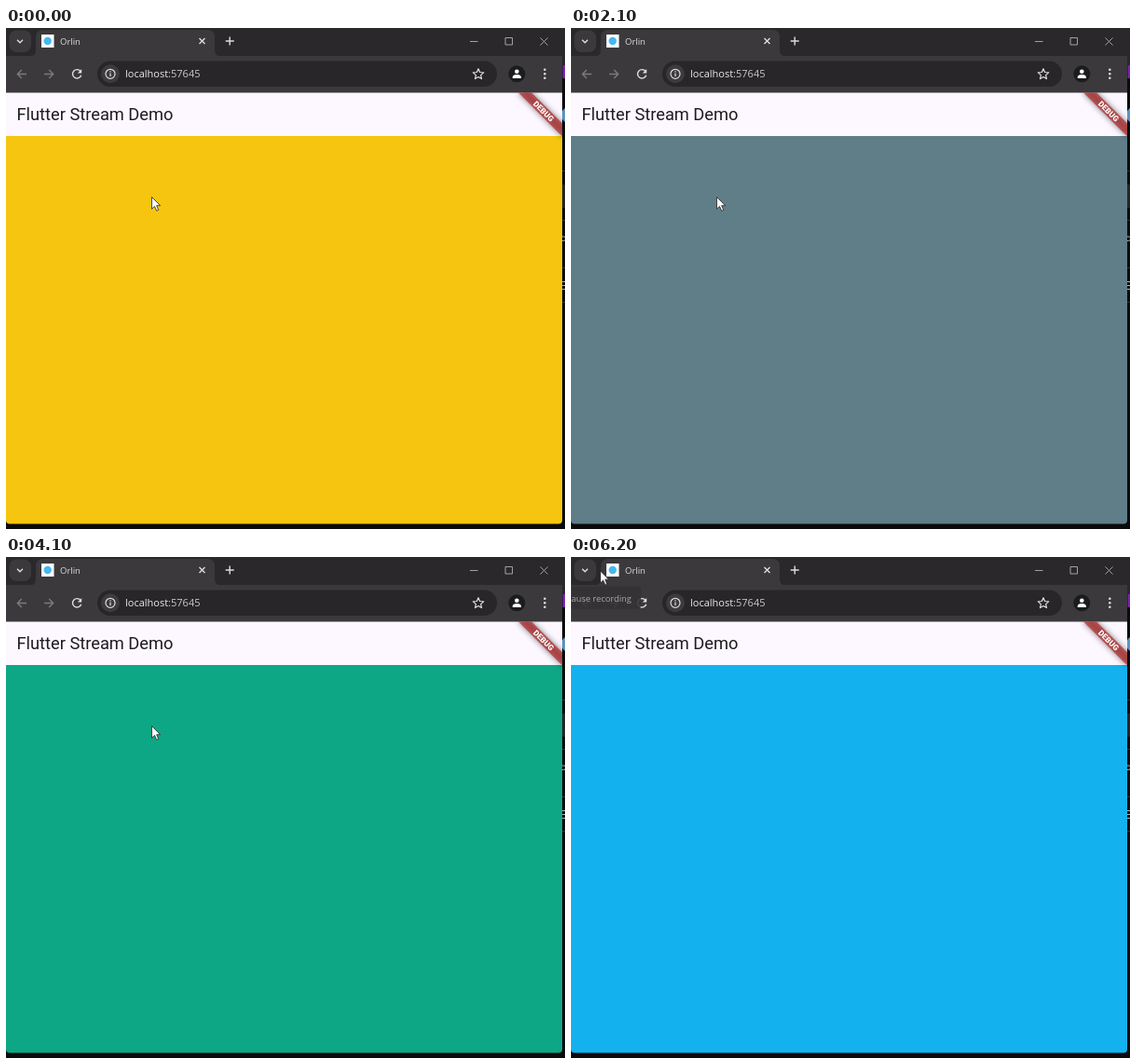
Write an HTML page that moves like this. It is 600 px wide and 538 px high and loops after 6300 ms.

```html
<!DOCTYPE html>
<html lang="en">
<head>
<meta charset="utf-8">
<title>Stream colours</title>
<style>
  html, body { margin: 0; width: 100%; height: 100%; overflow: hidden; background: #0b0b0d; }
  svg { display: block; width: 100vw; height: 100vh; }
  .ui { font-family: "Open Sans", "Noto Sans", sans-serif; }
  .app { font-family: Roboto, sans-serif; }
  .line { fill: none; stroke: #dedcdf; stroke-width: 1.4; }
  .dim { stroke: #7b797c; }
  .win { stroke: #a3a1a4; stroke-width: 1; }

  .page, .cursor, .tip { animation: 6300ms step-end infinite; }
  .page { animation-name: colours; }
  .cursor { animation-name: move; }
  .tip { animation-name: show; }

  @keyframes colours {
    0%, 42.857%, 84.126% { fill: #f6c50f; }
    11.111%, 52.38%, 95.238% { fill: #13b2ee; }
    20.634%, 63.492% { fill: #0da786; }
    31.746%, 74.603% { fill: #607e88; }
  }
  @keyframes move {
    0% { transform: translate(156px, 181px); }
    82.539% { transform: translate(134px, 150px); }
    84.126% { transform: translate(84px, 82px); }
    85.714% { transform: translate(44px, 30px); }
    87.301%, 100% { transform: translate(31px, 14.5px); }
  }
  @keyframes show {
    0% { opacity: 0; }
    96.825% { opacity: .45; }
    98.412%, 100% { opacity: .88; }
  }
</style>
</head>
<body>
<svg viewBox="0 0 600 538" preserveAspectRatio="none">
  <defs>
    <clipPath id="window"><path d="M0 0H597V528.5a4 4 0 0 1-4 4H4a4 4 0 0 1-4-4Z"/></clipPath>
    <clipPath id="appbar"><rect y="69.5" width="597" height="463"/></clipPath>
    <filter id="blur" x="-30%" y="-150%" width="160%" height="400%"><feGaussianBlur stdDeviation="3.3"/></filter>
  </defs>

  <!-- desktop showing past the window -->
  <rect width="600" height="538" fill="#0b0b0d"/>
  <rect x="597" width="3" height="40" fill="#29282a"/>
  <rect x="597.5" y="40" width="2.5" height="14" fill="#7c21b4"/>
  <path d="M600 86a9 9 0 0 0 0 15Z" fill="#5b93c4"/>
  <path d="M597 153.500h3M597 206.500h3M597 257.500h3M597 294.500h3" stroke="#343438"/>
  <rect x="597" y="168" width="3" height="25" fill="#242428"/>
  <path d="M597 224h1.500a2 2 0 0 1 0 4.500H597M597 272.500h3M597 276.500h3M597 280.500h3" fill="none" stroke="#b4b4b6"/>

  <g clip-path="url(#window)">
    <rect width="597" height="31" fill="#2a282b"/>
    <rect y="30" width="597" height="40" fill="#3b393c"/>

    <!-- tab strip -->
    <rect x="3.500" y="2.500" width="23.500" height="23.500" rx="7.500" fill="#3b393c"/>
    <path class="line" d="M12 12.700l3 3 3-3"/>
    <path d="M25 30.500q7 0 7-7V10q0-8 8-8H216q8 0 8 8V23.500q0 7 7 7Z" fill="#3b393c"/>
    <rect x="38" y="7" width="13.500" height="14" fill="#fff"/>
    <circle cx="44.700" cy="14" r="4.200" fill="#44b8ef"/>
    <text class="ui" x="58" y="18" font-size="9.500" fill="#dedcdf">Orlin</text>
    <path class="line" d="M207.500 11l6 6m0-6l-6 6"/>
    <path class="line" d="M235.700 14h9M240.200 9.500v9"/>
    <path class="line win" d="M498 14.500h8.500M536 10.500h7.500v7.500H536ZM573.500 10.500l8 8m0-8l-8 8"/>

    <!-- toolbar -->
    <path class="line dim" d="M22 49.500H12.500M16.800 45l-4.500 4.500 4.500 4.500M41 49.500h9.500M46.200 45l4.500 4.500-4.500 4.500"/>
    <path class="line" d="M80 46.500a4.700 4.700 0 1 0 .7 4.200"/>
    <path d="M81.200 44v4.400h-4.400Z" fill="#dedcdf"/>
    <rect x="98" y="35.500" width="429" height="27.500" rx="13.750" fill="#282629"/>
    <circle cx="112" cy="49.300" r="10" fill="#3d3b3e"/>
    <circle class="line" cx="112" cy="49.300" r="5" style="stroke-width:1.200"/>
    <path class="line" d="M112 48.500v3.500M112 46.200v1.300" style="stroke-width:1.200"/>
    <text class="ui" x="128" y="53.300" font-size="11" fill="#ebe9ec">localhost<tspan fill="#cbc9cc">:57645</tspan></text>
    <path class="line" style="stroke-width:1.200" stroke-linejoin="round"
      d="M507 43.700l1.600 3.800 4.100.4-3.100 2.700.9 4-3.500-2.100-3.500 2.100.9-4-3.100-2.700 4.100-.4Z"/>
    <circle cx="548.300" cy="49.300" r="9" fill="#1c1b1d"/>
    <g fill="#fff">
      <circle cx="548.300" cy="46.800" r="2.300"/>
      <path d="M543.700 54v-1q0-3 4.600-3t4.600 3v1Z"/>
    </g>
    <g fill="#dedcdf">
      <circle cx="578.300" cy="44.800" r="1.300"/>
      <circle cx="578.300" cy="49.300" r="1.300"/>
      <circle cx="578.300" cy="53.800" r="1.300"/>
    </g>

    <!-- app -->
    <rect y="69.500" width="597" height="47" fill="#fdf7ff"/>
    <rect class="page" y="116" width="597" height="417" fill="#f6c50f"/>
    <text class="app" x="11.500" y="99" font-size="18.260" fill="#1d1b20">Flutter Stream Demo</text>
    <g clip-path="url(#appbar)">
      <g transform="translate(597 69.500) rotate(45)">
        <rect x="-33.200" y="23.200" width="66.400" height="10" fill="#000" fill-opacity=".5" filter="url(#blur)"/>
        <rect x="-33.200" y="23.200" width="66.400" height="10" fill="#b71c1c" fill-opacity=".63"/>
        <text class="app" y="31.200" font-size="8.500" font-weight="900" text-anchor="middle" fill="#fff">DEBUG</text>
      </g>
    </g>
  </g>

  <g class="tip" opacity="0">
    <rect x="-20" y="31.500" width="95" height="24.500" rx="4" fill="#343235"/>
    <text class="ui" x="65" y="47.500" font-size="9.400" text-anchor="end" fill="#b9b7ba">Pause recording</text>
  </g>

  <path class="cursor" d="M.5.500V13.300L3.500 10.500 5.600 15.300 7.700 14.400 5.600 9.700H9.600Z"
    fill="#fff" stroke="#222" stroke-width=".8" stroke-linejoin="round"/>
</svg>
</body>
</html>
```
